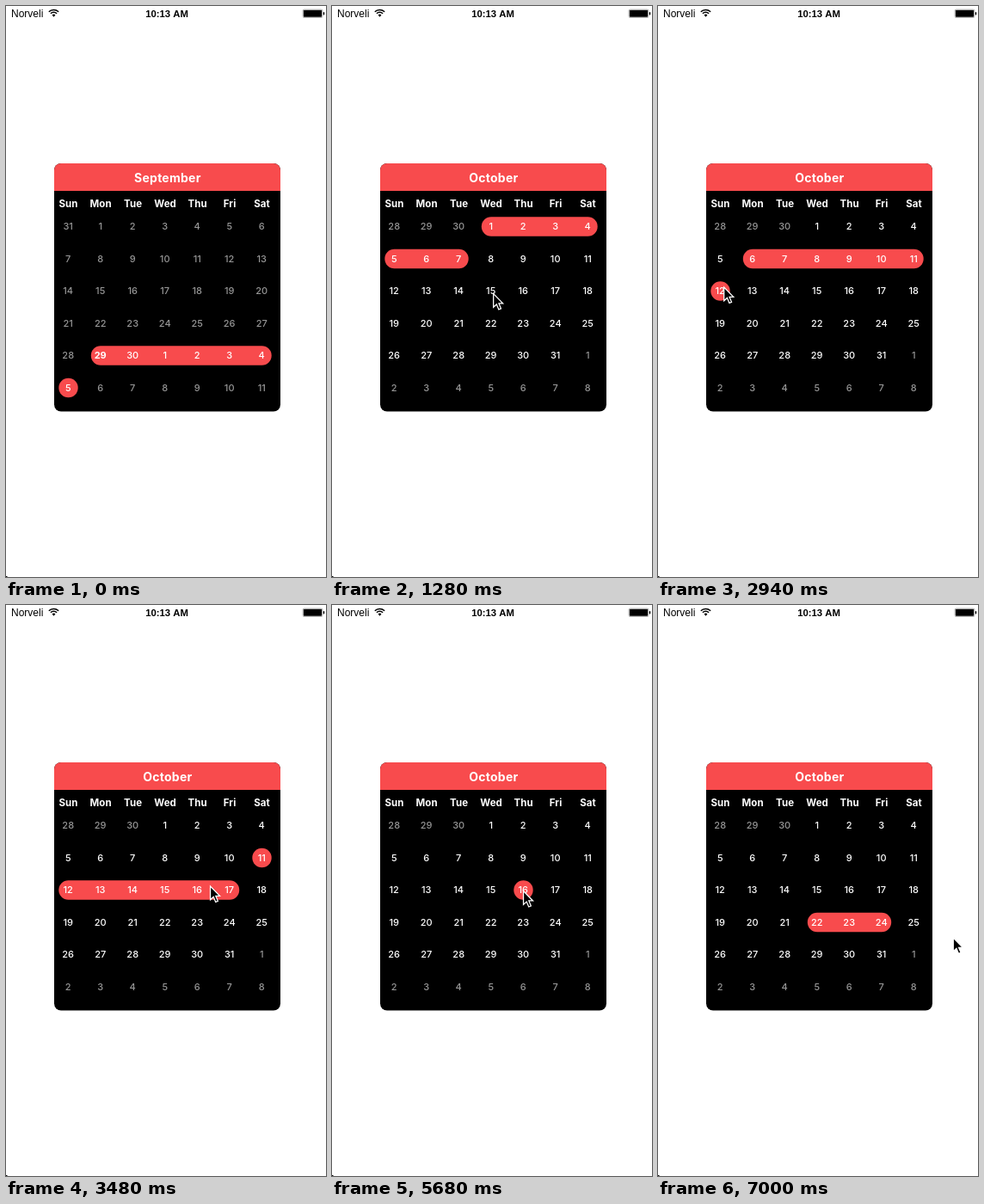
Animation of 372x664 px, one loop 7.18 s. Source, as an HTML page with a canvas:

```html
<!DOCTYPE html>
<html lang="en">
<head>
<meta charset="utf-8">
<title>Calendar range selection</title>
<style>
  html, body { margin: 0; width: 100%; height: 100%; overflow: hidden; background: #fff; }
  canvas { display: block; }
</style>
</head>
<body>
<canvas id="stage" width="372" height="664"></canvas>
<script>
const ctx = document.getElementById('stage').getContext('2d');
const LOOP = 7180;
const RED = '#f84b4d', WHITE = '#fff', GREY = '#969696';
const CELL = 37.5, LEFT = 72.5, TOP = 256.5, RADIUS = 11.2;

// Days count from October 1 = 1, so September 30 = 0.
const SEPTEMBER_GRID = -30, OCTOBER_GRID = -2, TODAY = -1, MAX_DAYS = 7;

// The pointer glides to a grid cell by the given time: [time, column, row, action].
const steps = [
  [40, 6.4, 4.4],
  [700, 0, 5],
  [1000, 2, 5, 'drag'],
  [1280, 3.07, 2.2],
  [1480, 2, 1],
  [2420, 6, 1, 'drag'],
  [2900, 0, 2],
  [3360, 5, 2, 'drag'],
  [3480, 4.4, 2],
  [3620, 4.4, 2],
  [4240, 2, 2, 'drag'],
  [4800, 1, 2, 'tap'],
  [5140, 1, 2],
  [5560, 4, 2.15, 'tap'],
  [5680, 4, 2.15],
  [6040, 3, 3, 'tap'],
  [6240, 3, 3],
  [6720, 5, 3, 'drag'],
  [6900, 5, 3],
  [7000, 7.22, 3.6]
];

const lerp = (a, b, p) => a + (b - a) * p;
const smooth = p => p * p * (3 - 2 * p);

function pointerAt(t) {
  const next = steps.findIndex(([time]) => time > t);
  if (next < 0) return steps.at(-1).slice(1, 3);
  const [t0, col0, row0] = steps[Math.max(next - 1, 0)];
  const [t1, col1, row1] = steps[next];
  const p = smooth(Math.max(0, (t - t0) / (t1 - t0)));
  return [lerp(col0, col1, p), lerp(row0, row1, p)];
}

// Replays every tap and drag up to time t.
function selectionAt(t) {
  let first = TODAY, last = first + MAX_DAYS - 1, grid = SEPTEMBER_GRID;
  steps.forEach(([end, , , action], i) => {
    const begin = i ? steps[i - 1][0] : 0;
    if (!action || t < (action === 'tap' ? end : begin)) return;
    const [col, row] = pointerAt(Math.min(t, end));
    last = grid + Math.round(row) * 7 + Math.round(col);
    first = action === 'tap' ? last : Math.max(first, last - MAX_DAYS + 1);
    if (t >= end && first > 0) grid = OCTOBER_GRID;
  });
  return { first, last, grid };
}

function text(str, x, y, font, color, align = 'center', spacing = 0) {
  ctx.font = font;
  ctx.fillStyle = color;
  ctx.textAlign = align;
  ctx.letterSpacing = spacing + 'px';
  ctx.fillText(str, x + spacing / 2, y);
}

function box(x, y, w, h, r, color) {
  ctx.fillStyle = color;
  ctx.beginPath();
  ctx.roundRect(x, y, w, h, r);
  ctx.fill();
}

function arcUp(radius) {
  ctx.arc(55.5, 12.2, radius, -Math.PI * 0.76, -Math.PI * 0.24);
}

function statusBar() {
  text('Norveli', 6, 13, '12px "Liberation Sans", sans-serif', '#000', 'left');
  text('10:13 AM', 187, 13, 'bold 11.3px "Liberation Sans", sans-serif', '#000');

  ctx.strokeStyle = ctx.fillStyle = '#000';
  ctx.lineWidth = 1.5;
  for (const radius of [4.9, 7.8]) {
    ctx.beginPath();
    arcUp(radius);
    ctx.stroke();
  }
  ctx.beginPath();
  ctx.moveTo(55.5, 12.8);
  arcUp(2.6);
  ctx.fill();

  box(344.7, 3.7, 23.6, 10.1, 1.8, '#888');
  box(345.2, 4.2, 22.6, 9.1, 1.4, WHITE);
  box(345.8, 4.8, 21.4, 7.9, 0.8, '#000');
  box(368.8, 7, 1.4, 3.5, 0.7, '#000');
  box(0, 663, 1.5, 1, 0, '#000');
}

function calendar({ first, last, grid }) {
  const october = grid === OCTOBER_GRID;

  box(56, 183, 263, 288.5, 8, '#000');
  box(56, 183, 263, 32, [8, 8, 0, 0], RED);
  text(october ? 'October' : 'September', 187.7, 204.5,
    'bold 14px Inter, sans-serif', WHITE, 'center', 0.25);
  ['Sun', 'Mon', 'Tue', 'Wed', 'Thu', 'Fri', 'Sat'].forEach((name, col) =>
    text(name, LEFT + col * CELL, 234, 'bold 11.5px Inter, sans-serif', WHITE, 'center', 0.1));

  for (let row = 0; row < 6; row++) {
    const sunday = grid + row * 7;
    const y = TOP + row * CELL;
    const from = Math.max(first - sunday, 0);
    const to = Math.min(last - sunday, 6);
    if (from <= to) {
      box(LEFT + from * CELL - RADIUS, y - RADIUS,
        (to - from) * CELL + 2 * RADIUS, 2 * RADIUS, RADIUS, RED);
    }
    for (let col = 0; col < 7; col++) {
      const day = sunday + col;
      const label = new Date(2014, 9, day).getDate();
      const selected = col >= from && col <= to;
      const bright = selected || (october && day > 0 && day <= 31);
      const weight = day === TODAY && !october ? 700 : 500;
      text(label, LEFT - 0.3 + col * CELL, y + 3.7,
        weight + ' 11px Inter, sans-serif', bright ? WHITE : GREY);
    }
  }
}

function cursor(t) {
  if (t < steps[0][0]) return;
  const [col, row] = pointerAt(t);
  ctx.save();
  ctx.translate(LEFT - 0.5 + col * CELL, TOP - 5 + row * CELL);
  ctx.scale(1.05, 1.05);
  const arrow = new Path2D('M.5 .5V15.5L4 12.3 6.4 18 8.9 17 6.5 11.3H11Z');
  ctx.fillStyle = '#000';
  ctx.fill(arrow);
  ctx.strokeStyle = WHITE;
  ctx.lineWidth = 1.2;
  ctx.stroke(arrow);
  ctx.restore();
}

function draw(t) {
  ctx.fillStyle = WHITE;
  ctx.fillRect(0, 0, 372, 664);
  statusBar();
  calendar(selectionAt(t));
  cursor(t);
}

const begin = performance.now();
function tick() {
  draw((performance.now() - begin) % LOOP);
  requestAnimationFrame(tick);
}
tick();
</script>
</body>
</html>
```
